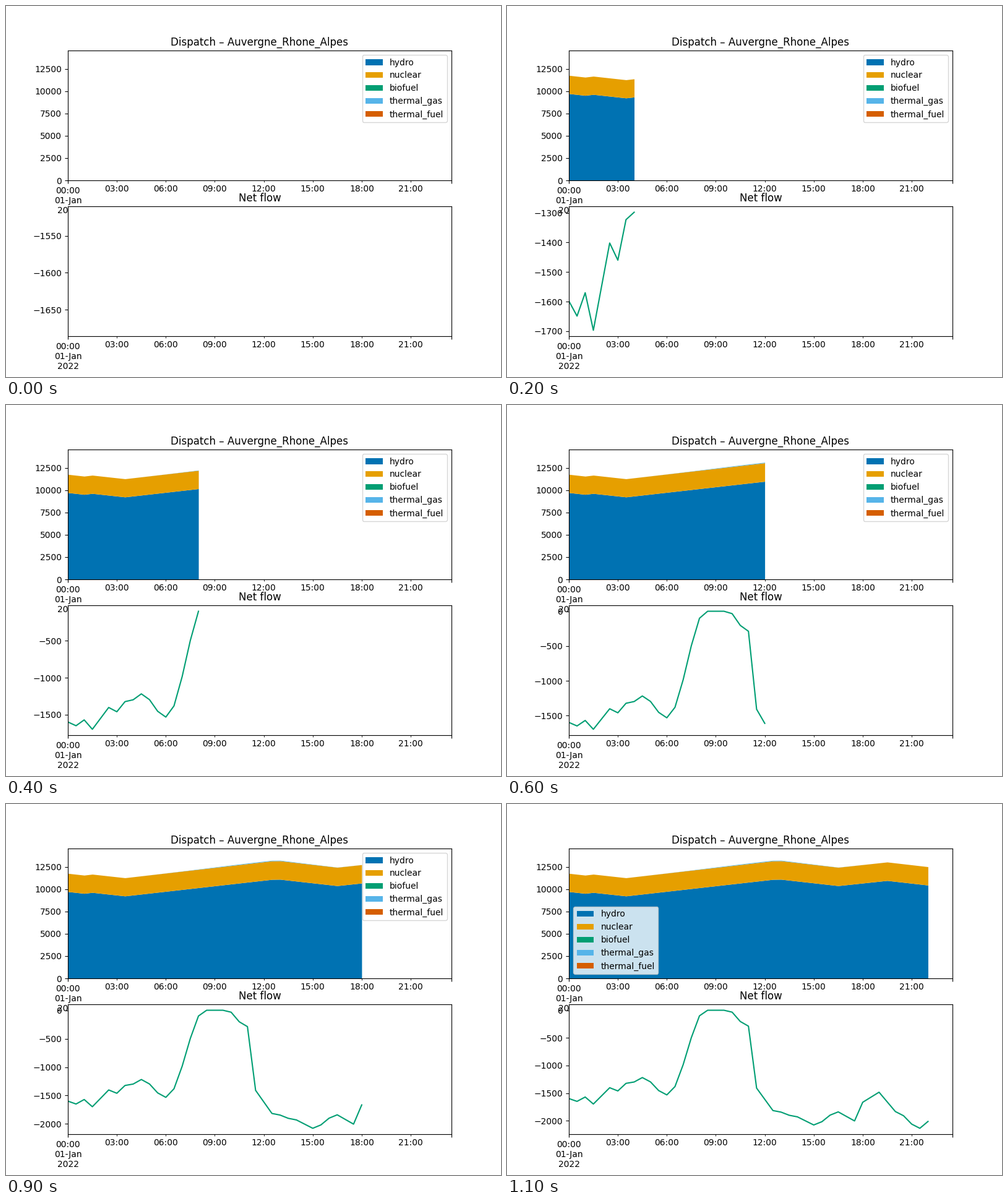
A matplotlib script for the animation above (1.2 s loop, 800x600 px).

```python
import numpy as np
import matplotlib.pyplot as plt
from matplotlib.animation import FuncAnimation

FRAMES = 12
STEPS_PER_FRAME = 4   # half-hour steps
LAST = 47             # 23:30

COLORS = {
    "hydro": "#0072B2",
    "nuclear": "#E69F00",
    "biofuel": "#009E73",
    "thermal_gas": "#56B4E9",
    "thermal_fuel": "#D55E00",
}

steps = np.arange((FRAMES - 1) * STEPS_PER_FRAME + 1)


def ramps(*points):
    """Straight ramps between (step, value) turning points."""
    return np.interp(steps, *zip(*points))


def swings(*points):
    """Cosine-eased swings between (step, value) turning points."""
    at, values = zip(*points)
    index = np.arange(len(at))
    whole, part = np.divmod(np.interp(steps, at, index), 1)
    return np.interp(whole + (1 - np.cos(np.pi * part)) / 2, index, values)


hydro = ramps((0, 9710), (2, 9512), (3, 9618), (7, 9224), (25, 11077),
              (26, 11090), (33, 10375), (39, 10955), (44, 10440))
nuclear = 2045 + 0.02 * (hydro - hydro[0])
gas = 68 * np.exp(-((steps - 23) / 8) ** 2)
idle = np.zeros(len(steps))
supply = np.array([hydro, nuclear, idle, gas, idle])

# imports only: the balance is capped at zero
flow = np.minimum(0, swings(
    (0, -1598), (1, -1649), (2, -1570), (3, -1697), (5, -1402), (6, -1460),
    (7, -1323), (8, -1298), (9, -1218), (12, -1532), (17, 50), (19, 50),
    (22, -288), (23, -1409), (25, -1815), (28, -1929), (30, -2076),
    (33, -1839), (35, -2003), (36, -1665), (38, -1483), (40, -1833),
    (43, -2136), (44, -2012)))

fig, (top, bottom) = plt.subplots(2, 1, figsize=(8, 6), dpi=100)


def setup_time_axis(ax):
    hours = range(3, 24, 3)
    ax.set_xlim(0, LAST)
    ax.set_xticks([0, LAST], ["00:00\n01-Jan\n2022", ""])
    ax.set_xticks([2 * h for h in hours], [f"{h:02d}:00" for h in hours],
                  minor=True)


for ax in (top, bottom):
    setup_time_axis(ax)

top.set_title("Dispatch – Auvergne_Rhone_Alpes")
top.set_ylim(0, 1.1 * supply.sum(axis=0).max())
bottom.set_title("Net flow")
line, = bottom.plot([], [], color=COLORS["biofuel"])


def flow_limits(values):
    lo, hi = values.min(), values.max()
    if lo == hi:
        lo, hi = lo - 0.05 * abs(lo), hi + 0.05 * abs(hi)
    pad = 0.05 * (hi - lo)
    return lo - pad, hi + pad


def update(frame):
    n = frame * STEPS_PER_FRAME + 1
    for area in list(top.collections):
        area.remove()
    top.stackplot(steps[:n], supply[:, :n], labels=list(COLORS),
                  colors=list(COLORS.values()), edgecolor="face", linewidth=0)
    # the legend gives way once the areas reach it
    top.legend(loc="upper right" if n <= 37 else "lower left")

    line.set_data(steps[:n], flow[:n])
    bottom.set_ylim(*flow_limits(flow[:n]))
    return []


anim = FuncAnimation(fig, update, frames=FRAMES, interval=100,
                     repeat=True, repeat_delay=0, blit=False)
plt.show()
```
